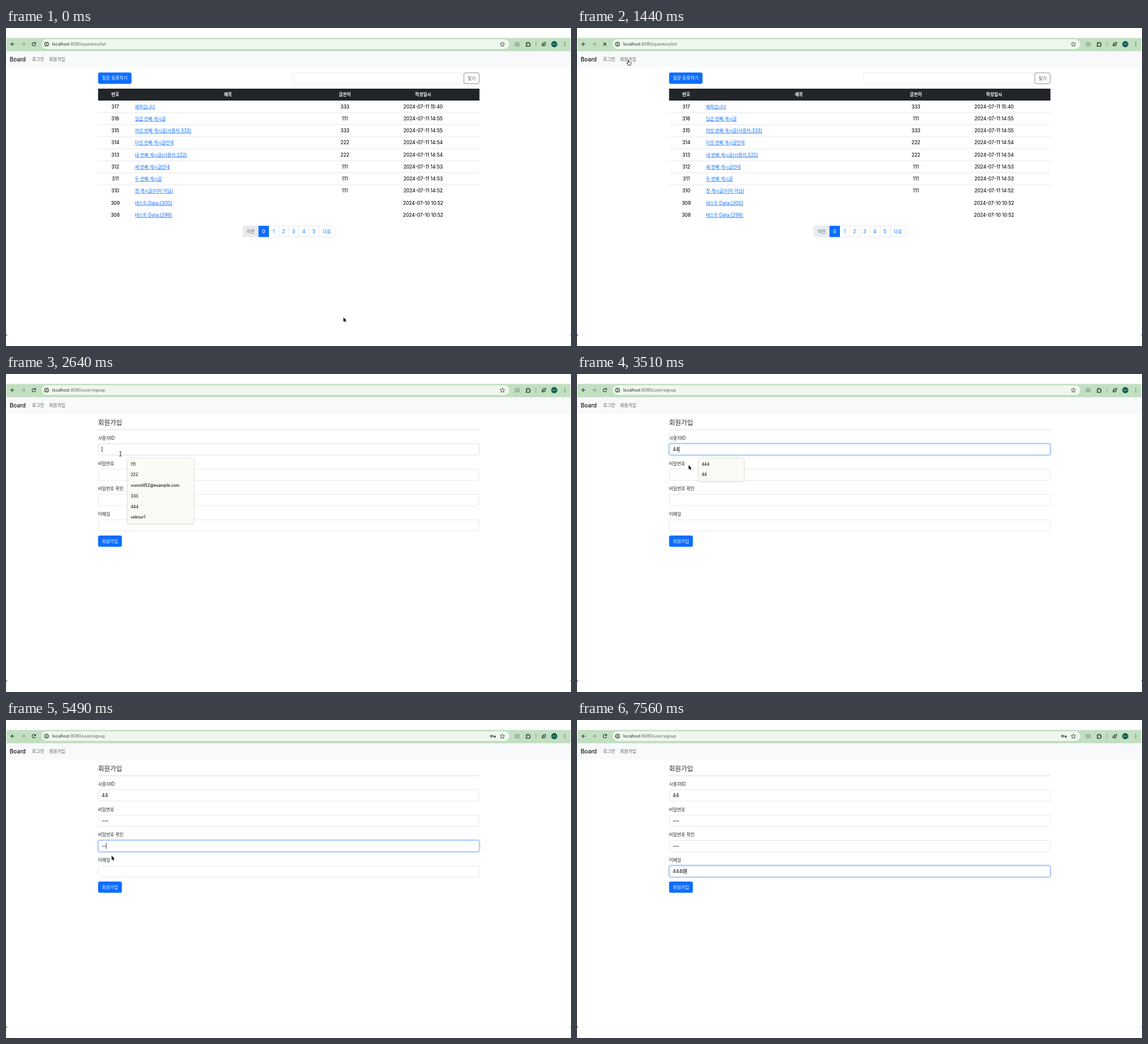
Animation, 997 px wide and 561 px high, one loop 8 s. Source, as an HTML page:

```html
<!DOCTYPE html>
<html lang="ko">
<head>
<meta charset="utf-8">
<title>Board</title>
<style>
  html, body { margin: 0; width: 100%; height: 100%; overflow: hidden; background: #fff; }
  svg { display: block; width: 100%; height: 100%; }
  text { font: 8.3px Inter, "Noto Sans CJK KR", "Noto Sans CJK", sans-serif; fill: #212529; white-space: pre; }
  .hangul { font-size: .93em; }
  .icon { fill: none; stroke: #26352a; stroke-width: 1.1; }
</style>
</head>
<body>
<svg viewBox="0 0 997 561">
  <g id="browser"></g>
  <g id="list"></g>
  <g id="signup"></g>
  <g id="live"></g>
</svg>
<script>
const LOOP = 8000, PAGE_SWITCH = 1530, BLINK = 480;
const BLUE = '#0d6efd', BORDER = '#dee2e6';
const layer = id => document.getElementById(id);

// Drawing helpers; text is placed by its vertical centre.
const rect = (x, y, w, h, fill, extra = '') =>
  `<rect x="${x}" y="${y}" width="${w}" height="${h}" fill="${fill}" ${extra}/>`;
const line = (x1, x2, y, color = BORDER) => rect(x1, y - .4, x2 - x1, .8, color);
const path = (d, extra = '') => `<path class="icon" d="${d}" ${extra}/>`;
const circle = (x, y, r, extra = '') => `<circle cx="${x}" cy="${y}" r="${r}" ${extra}/>`;
const text = (x, y, string, { size = 8.3, style = '', anchor = 'start' } = {}) =>
  `<text x="${x}" y="${y + size * .36}" text-anchor="${anchor}" style="font-size:${size}px;${style}">` +
  string.replace(/[가-힣]+/g, '<tspan class="hangul">$&</tspan>') + '</text>';
const centred = (x, y, string, style = '') => text(x, y, string, { style, anchor: 'middle' });
const box = (x, y, w, h, stroke = BORDER, fill = '#fff') =>
  rect(x, y, w, h, fill, `rx="3" stroke="${stroke}" stroke-width=".8"`);
const button = (x, y, w, h, label) =>
  rect(x, y, w, h, BLUE, 'rx="3"') + centred(x + w / 2, y + h / 2, label, 'fill:#fff;font-weight:500');

function drawBrowser() {
  const grey = 'style="stroke:#8a9a8c"';
  return rect(1, 17.5, 995, 23.5, '#c2dfc2') +
    rect(63, 20, 825, 17, '#f0f7ee', 'rx="8.5"') +
    circle(71.5, 28.5, 6, 'fill="#dcebd9"') +
    path('M15 28.5H9m2.7-2.8L9 28.5l2.7 2.8') +
    path('M27.3 28.5h6m-2.7-2.8 2.7 2.8-2.7 2.8', grey) +
    circle(71.5, 28.5, 3.3, 'class="icon"') + path('M71.5 28v2.3m0-3.7v.8') +
    path('M876 24.6l1.2 2.6 2.9.3-2.2 1.9.7 2.9-2.6-1.5-2.6 1.5.7-2.9-2.2-1.9 2.9-.3z', 'style="stroke-width:.8"') +
    path('M898.5 26.3h1.7l.8-1.1h2l.8 1.1h1.7v5.5h-7z', grey) + circle(902, 29, 1.4, `class="icon" ${grey}`) +
    path('M918 26.4h2v-1.2h2v1.2h2v2h1.1v1.8h-1.1v2.2h-6v-2.2h1v-1.8h-1z') +
    rect(934.6, 24, .9, 9, '#7fa684') +
    path('M946 31.8q-1-5.8 6.2-6.6 .4 7-4.8 6.4-1.5-1.2 3-4') +
    circle(967.5, 28.5, 5.4, 'fill="#0b5c4a"') +
    text(967.5, 28.5, '회원', { size: 4, style: 'fill:#b9d8ce', anchor: 'middle' }) +
    [25.5, 28.5, 31.5].map(y => circle(986, y, .8, 'fill="#26352a"')).join('') +
    rect(1, 41, 995, 29, '#f8f9fa') +
    text(6.5, 55.5, 'Board', { size: 10, style: 'font-weight:500;fill:#111' }) +
    text(46, 55.5, '로그인', { style: 'fill:#555' }) +
    text(76, 55.5, '회원가입', { style: 'fill:#555' }) +
    rect(0, 541, 2, 1.2, '#222') + rect(995.5, 541, 1.5, 1, '#444');
}

function drawList() {
  const rows = [
    ['제목입니다', '333', '11 15:40'],
    ['일곱 번째 게시글', '111', '11 14:55'],
    ['여섯 번째 게시글(사용자:333)', '333', '11 14:55'],
    ['다섯 번째 게시글인데', '222', '11 14:54'],
    ['네 번째 게시글(사용자:222)', '222', '11 14:54'],
    ['세 번째 게시글인데', '111', '11 14:53'],
    ['두 번째 게시글', '111', '11 14:53'],
    ['첫 게시글(더미 아님)', '111', '11 14:52'],
    ['테스트 Data:[300]', '', '10 10:52'],
    ['테스트 Data:[299]', '', '10 10:52'],
  ];
  const dark = 'fill:#111;font-weight:500', heading = 'fill:#fff;font-weight:700';
  const table = rows.map(([title, author, date], i) => {
    const y = 138.7 + 21.25 * i;
    return centred(192.8, y, String(317 - i), dark) +
      text(227.5, y, title, { style: `fill:${BLUE};text-decoration:underline` }) +
      centred(598, y, author, dark) + centred(736, y, '2024-07-' + date, dark) +
      (i < 7 ? line(163, 835, y + 10.6) : '');
  }).join('');

  const edges = [418, 445.5, 464, 481, 498.5, 516.5, 534.5, 552.5, 580];
  const pager = ['이전', '0', '1', '2', '3', '4', '5', '다음'].map((label, i) => {
    const x = edges[i], w = edges[i + 1] - x;
    return (i == 0 ? rect(x, 349, w, 19.7, '#e9ecef', 'rx="3"') : '') +
      (i == 1 ? rect(x, 349, w, 19.7, BLUE) : i > 2 ? rect(x, 349, .7, 19.7, BORDER) : '') +
      centred(x + w / 2, 359, label, `fill:${['#5c636a', '#fff'][i] || BLUE};${i == 1 ? 'font-weight:500' : ''}`);
  }).join('');

  return button(162.5, 78.5, 59, 20, '질문 등록하기') +
    box(505.5, 79, 303, 19.3) + box(808, 79, 27, 19.3, '#6c757d') + centred(821.5, 88.7, '찾기', 'fill:#555') +
    rect(162.5, 107, 673, 21, '#212529') +
    centred(192.8, 117.5, '번호', heading) + centred(391.5, 117.5, '제목', heading) +
    centred(598, 117.5, '글쓴이', heading) + centred(736, 117.5, '작성일시', heading) +
    table + box(418, 349, 162, 19.7) + pager;
}

const fields = [
  { label: '사용자ID', y: 133, focus: 2610, value: '44', keys: [3120, 3270] },
  { label: '비밀번호', y: 177.7, focus: 4020, value: '•••', keys: [4410, 4560, 4710] },
  { label: '비밀번호 확인', y: 222.3, focus: 5220, value: '•••', keys: [5370, 5460, 5580] },
  { label: '이메일', y: 267, focus: 6030, value: '444@', keys: [6690, 6840, 7020, 7560] },
];

function drawSignup() {
  return text(162.5, 86, '회원가입', { size: 12.4, style: 'font-weight:500' }) +
    line(163, 836, 98.3, '#cfd2d4') +
    fields.map(f => text(162.5, f.y - 20, f.label) + box(163, f.y - 9.8, 672, 19.6)).join('') +
    button(162.5, 285, 42, 19.7, '회원가입');
}

const suggestions = [
  { from: 2610, to: 3120, y: 148, w: 118, items: ['111', '222', 'vunrol452@example.com', '333', '444', 'velmor1'] },
  { from: 3120, to: 4020, y: 148, w: 81, items: ['444', '44'] },
  { from: 6060, to: 6690, y: 282.5, w: 118, items: ['111@example.com', '222@example.com', 'vunrol452@example.com',
    '333@example.com', '44@example.com', 'velmor1@example.com'] },
  { from: 6690, to: 7020, y: 282.5, w: 81, items: ['44@example.com'] },
];

const drawSuggestions = ({ y, w, items }) => {
  const h = 4 + 18.75 * items.length;
  return rect(213.5, y + 1, w + 1, h, '#0002', 'rx="3"') +
    `<path d="M219 ${y}l4-3 4 3z" fill="#f4f7f1"/>` +
    rect(214, y, w, h, '#f9fcf5', 'rx="3" stroke="#d5dcd2" stroke-width=".7"') +
    items.map((item, i) =>
      text(220, y + 11.2 + 18.75 * i, item, { size: 7, style: 'font-weight:500;fill:#111' })).join('');
};

const clamp = v => Math.min(1, Math.max(0, v));
const smooth = v => (v = clamp(v), v * v * (3 - 2 * v));

function drawField(field, i, t) {
  const { y, focus, value, keys } = field;
  const blur = fields[i + 1]?.focus ?? Infinity;
  const typed = keys.filter(k => k <= t).length;
  const ring = smooth((t - focus) / 150) * (1 - smooth((t - blur) / 150));
  const isDots = value[0] == '•';
  let out = '';
  if (ring > 0) {
    out += `<g opacity="${ring}">` +
      rect(162, y - 10.8, 674, 21.6, '#fff', 'rx="4" stroke="#c2d7fe" stroke-width="2"') +
      box(163, y - 9.8, 672, 19.6, '#86b7fe') + '</g>';
  }
  out += isDots
    ? keys.slice(0, typed).map((_, n) => circle(171.2 + 3.6 * n, y + .5, .95, 'fill="#212529"')).join('')
    : text(169, y, value.slice(0, typed), { style: 'font-weight:500' });
  const lastInput = typed ? keys[typed - 1] : focus;
  if (t >= focus && t < blur && (t - lastInput) % (2 * BLINK) < BLINK) {
    const advance = isDots ? 3.75 * typed : typed == 4 ? 23.7 : 5.4 * typed;
    out += rect(169 + advance, y - 5, .8, 10, '#111');
  }
  return out;
}

// Pointer stops: time, x, y.
const stops = [
  [480, 595.5, 510.5], [1260, 91, 57], [1740, 91, 57], [2130, 203, 148], [2280, 202, 141],
  [3390, 202, 141], [3630, 192, 180], [4890, 192, 180], [5160, 188, 222], [5400, 188, 222],
  [5490, 186.5, 239.5], [5700, 186, 268],
];
const hidden = [[3120, 3390], [4410, 4950], [5370, 5415], [6690, LOOP]];

function pointerAt(t) {
  const next = stops.findIndex(s => s[0] > t);
  if (next < 1) return (next ? stops.at(-1) : stops[0]).slice(1);
  const [t0, x0, y0] = stops[next - 1], [t1, x1, y1] = stops[next];
  const p = smooth((t - t0) / (t1 - t0));
  return [x0 + (x1 - x0) * p, y0 + (y1 - y0) * p];
}

function drawPointer(t) {
  if (hidden.some(([from, to]) => t >= from && t < to)) return '';
  const [x, y] = pointerAt(t);
  const overLink = x > 76 && x < 105 && y > 49 && y < 62;
  const overField = t >= PAGE_SWITCH && x > 163 && fields.some(f => y > f.y - 7 && y < f.y + 10);
  const shape = overLink
    ? '<path d="M-.8 8.5l-2.1-3.2q-.3-1 .8-.8l1 .8V.2q.8-1 1.5 0v2.9q.8-.6 1.4.2.8-.5 1.4.3.9-.3 1.2.6v2.3l-.8 2z" fill="#fff" stroke="#111" stroke-width=".9"/>'
    : overField
      ? '<path d="M-1.8-4Q0-4 0-3 0-4 1.8-4M0-3V3M-1.8 4Q0 4 0 3 0 4 1.8 4" fill="none" stroke="#111" stroke-width=".9"/>'
      : '<path d="M0 0v7.4l1.7-1.5 1.3 2.8 1.3-.6L3 5.4h2.3z" fill="#000" stroke="#fff" stroke-width=".7" paint-order="stroke"/>';
  return `<g transform="translate(${x} ${y})">${shape}</g>`;
}

function drawAddress(t) {
  const loading = t >= 1380 && t < 1620;
  const route = t < PAGE_SWITCH ? 'question/list' : 'user/signup';
  const url = `localhost<tspan fill="#586259">:8080/${route}</tspan>`;
  return (loading
    ? path('M46.6 26l5 5m0-5l-5 5')
    : path('M51.6 26.7a3 3 0 1 0 .5 2.6M52.2 25v2.4h-2.4')) +
    text(81.5, 28.5, url, { size: 7.2 }) +
    (t >= 4410 ? circle(856.6, 28.6, 1.7, 'class="icon"') + path('M858.4 28.3h5v2.2h-1.8v-2') : '');
}

layer('browser').innerHTML = drawBrowser();
layer('list').innerHTML = drawList();
layer('signup').innerHTML = drawSignup();

function render() {
  const t = performance.now() % LOOP;
  const onList = t < PAGE_SWITCH;
  layer('list').style.display = onList ? '' : 'none';
  layer('signup').style.display = onList ? 'none' : '';
  layer('live').innerHTML = drawAddress(t) +
    (onList ? '' : fields.map((f, i) => drawField(f, i, t)).join('')) +
    suggestions.filter(s => t >= s.from && t < s.to).map(drawSuggestions).join('') +
    drawPointer(t);
  requestAnimationFrame(render);
}
render();
</script>
</body>
</html>
```
